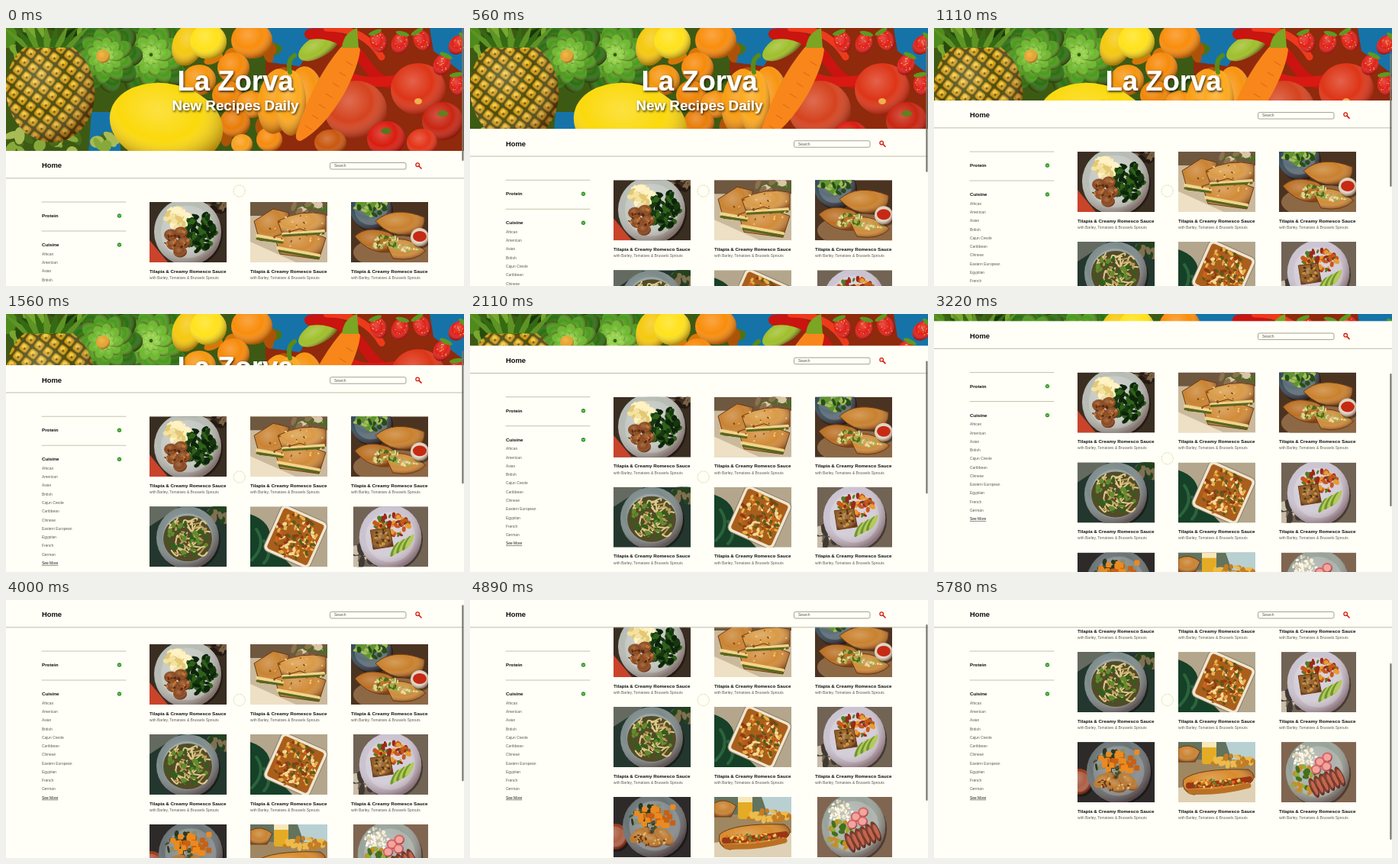
An HTML page that plays this animation: 600x338 px, repeating every 5.89 s.

```html
<!DOCTYPE html>
<html lang="en">
<head>
<meta charset="utf-8">
<style>
  html, body { margin: 0; height: 100%; overflow: hidden; background: #fffff8; }
  svg { display: block; width: 100vw; height: 100vh; font-family: "Liberation Sans", Arial, sans-serif; }
  .bold { font-weight: bold; }
  .small { font-size: 4.93px; fill: #5c5c52; }
  .label { font-size: 6.24px; font-weight: bold; fill: #0c0c0a; }
  .title { fill: #fff; font-weight: bold; text-anchor: middle; filter: url(#shadow); }
</style>
</head>
<body>
<svg id="stage" viewBox="0 0 600 338"></svg>
<script>
const PAPER = '#fffff8', NAV_TOP = 161, LOOP = 5890, STEP = LOOP / 53;

let seed = 7;
const rand = () => (seed = (seed * 16807) % 2147483647) / 2147483647;
const between = (a, b) => a + rand() * (b - a);
const repeat = (n, make) => Array.from({ length: n }, (_, i) => make(i)).join('');

const rect = (x, y, w, h, fill, extra = '') =>
  `<rect x="${x}" y="${y}" width="${w}" height="${h}" fill="${fill}" ${extra}/>`;
const oval = (x, y, rx, ry, fill, turn = 0) =>
  `<ellipse cx="${x}" cy="${y}" rx="${rx}" ry="${ry}" fill="${fill}" transform="rotate(${turn} ${x} ${y})"/>`;
const ball = (x, y, rx, ry, fill, turn = 0) =>
  oval(x, y, rx, ry, fill, turn) + oval(x, y, rx, ry, 'url(#shade)', turn);
const shape = (d, fill) => `<path d="${d}" fill="${fill}"/>`;
const line = (d, color, width) =>
  `<path d="${d}" fill="none" stroke="${color}" stroke-width="${width}" stroke-linecap="round"/>`;
const text = (x, y, s, cls, extra = '') => `<text x="${x}" y="${y}" class="${cls}" ${extra}>${s}</text>`;
const group = (x, y, body, extra = '') => `<g transform="translate(${x} ${y})" ${extra}>${body}</g>`;

// Random flecks inside an ellipse
const scatter = (n, x, y, rx, ry, size, colors) => repeat(n, i => {
  const a = between(0, 6.283), r = Math.sqrt(rand());
  return oval(x + rx * r * Math.cos(a), y + ry * r * Math.sin(a), size * between(.7, 1.4),
    size * between(.4, .9), colors[i % colors.length], between(0, 180));
});

const rosette = (x, y, size) => ['#2c6f12', '#4b9a1c', '#6cb92b', '#8fd044'].map((color, ring) => {
  const r = size * (1 - ring * .25);
  return repeat(9, i => {
    const deg = i * 40 + ring * 20, a = deg * Math.PI / 180;
    return ball(x + r * .62 * Math.cos(a), y + r * .62 * Math.sin(a), r * .45, r * .33, color, deg);
  });
}).join('');

const strawberry = (x, y, turn) => `<g transform="rotate(${turn} ${x} ${y})">` +
  ball(x, y, 11, 14, '#e0201a') + scatter(14, x, y, 9, 11, .8, ['#ffc34a']) +
  oval(x, y - 13, 9, 3, '#5b9a22') + '</g>';

const banner = () => [
  rect(0, 0, 600, 165, '#3d5a14'),
  rect(340, 0, 260, 165, '#8f2a0c'),
  shape('M335 0H415L385 50L345 45ZM555 0H600V60L560 30ZM112 110H150V165H108Z', '#1673a8'),
  scatter(50, 60, 15, 100, 40, 13, ['#264c0d', '#4f8b1c', '#79a72f', '#17360b']),
  scatter(30, 60, 150, 90, 18, 9, ['#86a93a', '#476b1a', '#a9bb55']),
  rosette(190, 35, 52), rosette(130, 36, 46),
  ball(127, 37, 9, 9, '#e5a52b'),
  ball(58, 82, 58, 68, 'url(#rind)', -8),
  repeat(9, i => shape(`M${22 + i * 7} 25Q${8 + i * 10} 12 ${-8 + i * 15} -5L${38 + i * 6} 26Z`, i % 2 ? '#356a14' : '#5d9425')),
  scatter(24, 290, 75, 95, 70, 11, ['#d97508', '#ac5308', '#4a7417']),
  ball(238, 22, 20, 28, '#f5c90f', 18), ball(265, 18, 24, 23, '#ffe21a'),
  ball(322, 16, 27, 24, '#f98d0c'), ball(298, 52, 21, 20, '#f78a0a'),
  ball(253, 68, 22, 20, '#f5960e'), ball(290, 88, 20, 19, '#ef8608'),
  ball(321, 100, 19, 18, '#f79311'), ball(300, 124, 20, 19, '#e97c08'),
  ball(345, 146, 17, 16, '#f78b0c'), ball(309, 152, 14, 13, '#f8a01b'),
  ball(210, 126, 75, 53, '#fbd90c', 12),
  ball(354, 96, 24, 43, '#f99d12', 8), ball(394, 92, 24, 42, '#f79410', -6), ball(373, 98, 20, 43, '#fda91d'),
  line('M372 58Q368 42 378 36', '#5a8a18', 6),
  ball(410, 24, 30, 14, '#9fbf2a', -30),
  line('M398 8Q440 2 470 45T520 62', '#c91410', 14), line('M420 0Q470 0 492 38', '#ee3a1c', 9),
  line('M442 60Q470 78 520 66', '#d81a12', 13),
  ball(458, 107, 41, 38, '#d5431f'), ball(540, 80, 36, 34, '#dd3517'),
  ball(498, 145, 25, 23, '#d81d10'), ball(572, 122, 27, 25, '#c82612'), ball(545, 150, 20, 18, '#e33418'),
  ball(425, 150, 21, 17, '#c9570f'),
  oval(540, 96, 5, 4, '#f0b04a'), oval(498, 135, 7, 4, '#56781c'), oval(572, 112, 7, 4, '#63801e'),
  strawberry(488, 18, -20), strawberry(516, 20, 15), strawberry(545, 16, -30),
  strawberry(571, 48, 25), strawberry(592, 74, -10), strawberry(592, 22, 40),
  shape('M438 26Q454 10 464 28Q462 50 443 86Q416 132 386 148Q376 148 382 132Q404 66 438 26Z', '#f8861a'),
  repeat(7, i => line(`M${446 - i * 9} ${44 + i * 14}l8 5`, '#d8660d', 1)),
  shape('M440 26Q442 6 460 0L462 26Z', '#7ba522')
].join('');

const plate = (x, y, r, color) =>
  oval(x + 2, y + 3, r, r * .98, '#00000066') + ball(x, y, r, r, color) + oval(x, y, r * .8, r * .78, '#ffffff30');
const backdrop = color => rect(0, 0, 101, 79, color);
const bread = (d, crust = '#c98332') => shape(d, crust) + `<path d="${d}" fill="url(#shade)" stroke="#6d3b12"/>`;
const GREENS = ['#17380f', '#2f6119', '#0d240b'];

const photos = [
  () => backdrop('#3a2d22') + shape('M0 50L24 79H0Z', '#c9442a') + scatter(20, 85, 8, 20, 10, 4, ['#7b6144', '#241a13']) +
    plate(50, 39, 44, '#b6bbb3') + scatter(90, 66, 40, 19, 25, 4.5, GREENS) +
    scatter(45, 36, 20, 15, 12, 4.5, ['#f3e2a2', '#e4c873', '#fff2c4']) +
    [[28, 43], [41, 40], [31, 55], [45, 53], [40, 65]].map(([x, y]) => ball(x, y, 9, 7.5, '#8b481c')).join('') +
    scatter(20, 37, 50, 17, 14, 2, ['#5c2a10', '#c27a38']),
  () => backdrop('#cbb99c') + rect(0, 0, 101, 18, '#6f5840') + scatter(25, 80, 8, 24, 10, 5, ['#8f7050', '#4d6b25', '#d8c6a7']) +
    shape('M0 52L60 79H0Z', '#eee0c5') +
    bread('M5 25L30 9L51 14L43 53L12 50Z') + bread('M36 25Q66 9 99 16V39L42 42Z', '#d99a46') +
    bread('M32 45L65 35L99 47L90 75L39 68Z', '#d18b38') +
    line('M9 44L42 50M43 42L96 38M36 60L90 70', '#f1d48c', 4) + line('M9 48L42 53M43 44L96 41M38 64L89 73', '#55691f', 3) +
    scatter(30, 61, 36, 36, 24, 1.4, ['#8c4c18', '#f2c779']),
  () => backdrop('#4b3322') + plate(26, 9, 27, '#344b58') + scatter(45, 27, 7, 22, 11, 4, ['#5f9430', '#a3bd57', '#294d17']) +
    oval(58, 66, 55, 22, '#8d6844') +
    bread('M32 25Q56 4 96 20Q98 40 73 43Q50 45 32 25Z', '#c9812d') + bread('M5 45Q20 30 49 40Q66 49 55 65Q25 70 5 45Z', '#b96f24') +
    bread('M45 53Q70 40 98 64Q84 79 55 74Z', '#d08c3a') +
    scatter(40, 45, 53, 18, 9, 2.5, ['#a7b34e', '#e4d594', '#486b1d']) + scatter(25, 73, 60, 17, 5, 2, ['#9bad49', '#e9d9a0']) +
    plate(90, 46, 12, '#ddd2bb') + oval(90, 45, 9, 7, '#c62a14'),
  () => backdrop('#23372e') + shape('M0 0H40L0 26Z', '#646a60') + scatter(20, 85, 10, 18, 14, 6, ['#24421e', '#7f704f']) +
    plate(50, 41, 41, '#7c8a8a') + oval(50, 42, 32, 30, '#514c27') +
    repeat(42, () => { const x = between(25, 67), y = between(20, 63);
      return line(`M${x} ${y}q${between(-14, 14)} ${between(-16, 16)} ${between(2, 14)} ${between(-8, 8)}`, rand() < .6 ? '#e0c98a' : '#b99c58', 2); }) +
    scatter(32, 50, 41, 28, 25, 3.5, ['#315e1c', '#628b2d']),
  () => backdrop('#b3a68c') + shape('M0 10Q30 20 26 48L55 79H0Z', '#164027') + line('M2 70Q22 50 8 30M18 74Q30 62 18 45', '#2b633d', 4) +
    '<g transform="rotate(24 58 40)">' + rect(26, 6, 66, 66, '#efe5cf', 'rx="7" stroke="#8b7c63"') +
    rect(30, 10, 58, 58, '#a95e1b', 'rx="4"') + '</g>' +
    scatter(150, 59, 39, 28, 29, 2.7, ['#e6b24c', '#8e3b12', '#f3d894', '#c8641d', '#5c5a1d']),
  () => backdrop('#716455') + scatter(16, 12, 65, 15, 15, 7, ['#c9bda8', '#413a32']) +
    plate(50, 40, 42, '#c9c2cf') + scatter(60, 52, 24, 24, 15, 3.5, ['#c8571c', '#547a22', '#e89b31', '#9b291b']) +
    bread('M23 31L49 28L54 52L27 56Z', '#8e5a23') + scatter(22, 38, 41, 12, 11, 1.8, ['#51320f', '#cd9846']) +
    repeat(6, i => oval(56 + i * 4, 56 - i * 2, 3, 11, i % 2 ? '#b6c95a' : '#6e982e', 30)),
  () => backdrop('#2d2a29') + plate(2, 52, 17, '#993b1b') + plate(54, 38, 42, '#697274') +
    scatter(50, 48, 33, 30, 24, 3.5, ['#2a3720', '#8b8d73', '#4a522d']) +
    repeat(30, () => rect(between(27, 76), between(8, 36), 7, 7, rand() < .6 ? '#eb8a1e' : '#c96012', 'rx="1.5"')) +
    [[35, 50, -30], [50, 57, 15], [66, 52, 40]].map(([x, y, a]) => ball(x, y, 15, 8.5, '#ba7930', a)).join('') +
    scatter(26, 51, 54, 23, 11, 1.8, ['#6c3612', '#e4b76b']),
  () => backdrop('#9f8762') + rect(0, 0, 101, 23, '#62735e') + rect(31, 0, 19, 29, '#e5ab25', 'rx="3"') + rect(31, 0, 19, 7, '#f6e8bc') +
    shape('M62 0H101V25L70 23Z', '#b9d0d2') + bread('M0 8Q14 0 29 12L22 26H0Z') + shape('M0 60L101 47V79H0Z', '#dfd1b5') +
    scatter(35, 72, 25, 28, 7, 4, ['#ecbb4b', '#c47d22']) +
    bread('M7 49Q25 34 92 36Q106 45 92 56L20 69Q3 65 7 49Z', '#d78b2c') +
    line('M14 57Q50 56 93 49', '#9b3516', 8) + scatter(55, 53, 54, 40, 6, 2, ['#f1c54f', '#66822a', '#e46a24']) +
    line('M16 65Q55 67 92 57', '#ba7024', 7),
  () => backdrop('#806651') + plate(49, 39, 43, '#98a299') + scatter(90, 33, 20, 17, 15, 2, ['#f7efd6', '#dbcfae', '#fffaf0']) +
    scatter(35, 35, 50, 21, 19, 4, ['#446f1f', '#c88d28', '#97ad38']) +
    repeat(6, i => ball(44 + i * 7, 60 - i * 3, 4.8, 14, '#75301f', -25) + oval(45 + i * 7, 60 - i * 3, 2.5, 10, '#c2664f', -25)) +
    [[52, 26], [62, 20], [47, 36], [61, 32]].map(([x, y]) => ball(x, y, 7, 6.5, '#d8596a') + oval(x, y, 5, 4.6, '#f1a797')).join('')
];

const card = (photo, i) => {
  const col = i % 3, inset = col === 2 && i > 2 ? 3 : 0;
  return group(188 + col * 132, 228 + Math.floor(i / 3) * 118,
    `<svg x="${inset}" width="${101 - inset}" height="79" viewBox="0 0 101 79" preserveAspectRatio="none">${photo()}</svg>` +
    text(0, 92.7, 'Tilapia &amp; Creamy Romesco Sauce', 'label') +
    text(0, 100.8, 'with Barley, Tomatoes &amp; Brussels Sprouts', 'small'));
};

const cuisines = ['African', 'American', 'Asian', 'British', 'Cajun Creole', 'Caribbean', 'Chinese',
  'Eastern European', 'Egyptian', 'French', 'German'];
const heading = (y, name) => line(`M47 ${y - 18}H157`, '#b4b496', .8) + text(47, y + 2.2, name, 'label') +
  oval(148.5, y, 2.7, 2.7, '#2f9a1d') + line(`M147.3 ${y - .5}l1.2 1.2l1.2 -1.2`, '#fff', .7);
const sidebar = heading(85, 'Protein') + heading(123, 'Cuisine') +
  cuisines.map((name, i) => text(47, 136.7 + i * 11.27, name, 'small')).join('') +
  text(47, 260.7, 'See More', 'small', 'style="fill:#222;text-decoration:underline"');

const nav = rect(0, 0, 600, 35.5, PAPER) + rect(0, 35.3, 600, 1, '#bdbda4') +
  text(47, 22.3, 'Home', 'bold', 'font-size="9.4" fill="#0c0c0a"') +
  rect(424.5, 15.5, 99.5, 8.5, PAPER, 'rx="2" stroke="#8c8c74" stroke-width=".8"') +
  text(430, 21.4, 'Search', 'small') +
  '<circle cx="539.2" cy="18.2" r="2.3" fill="none" stroke="#d8200c" stroke-width="1.3"/>' +
  line('M541 20l3 3', '#d8200c', 1.7);

const stage = document.getElementById('stage');
stage.innerHTML = `<defs>
  <radialGradient id="shade" cx=".4" cy=".35" r=".65">
    <stop offset="0" stop-color="#fff" stop-opacity=".22"/><stop offset=".55" stop-color="#fff" stop-opacity="0"/>
    <stop offset="1" stop-color="#300" stop-opacity=".4"/>
  </radialGradient>
  <pattern id="rind" width="14" height="14" patternUnits="userSpaceOnUse" patternTransform="rotate(45)">
    ${rect(0, 0, 14, 14, '#4c4a0c') + rect(1.5, 1.5, 11, 11, '#d29a18', 'rx="3"') + oval(6, 6, 3, 3, '#f0c93c') + oval(8, 8, 1.4, 1.4, '#5a4a0c')}
  </pattern>
  <filter id="shadow"><feDropShadow dx="1" dy="1.5" stdDeviation="1.4" flood-color="#000" flood-opacity=".85"/></filter>
</defs>` + banner() +
  text(300.5, 82, 'La Zorva', 'title', 'font-size="36.5"') +
  text(300.5, 108, 'New Recipes Daily', 'title', 'font-size="18.8"') +
  group(0, 0, rect(0, 0, 600, 340, PAPER) + sidebar, 'id="page"') +
  group(0, 0, photos.map(card).join(''), 'id="cards"') +
  group(0, 0, nav, 'id="nav"') +
  rect(597.3, 0, 2.2, 174, '#77776c', 'id="thumb" rx="1.1"') +
  '<circle id="pointer" cx="305.7" r="7.6" fill="#fffff0" fill-opacity=".4" stroke="#d3d39a" stroke-dasharray="1.6 1.2"/>';

const [page, cards, navBar, thumb, pointer] =
  ['page', 'cards', 'nav', 'thumb', 'pointer'].map(id => document.getElementById(id));

// Scroll distance at given times, joined by a smooth cubic
const keys = [[0, 0], [560, 29], [1560, 94], [2560, 135], [4000, 170], [4890, 206], [5780, 278]];
const slope = i => {
  if (i === 0) return .03;
  const a = keys[i - 1], b = keys[Math.min(i + 1, keys.length - 1)];
  return (b[1] - a[1]) / (b[0] - a[0]);
};
function scrollAt(t) {
  const i = Math.min(keys.length - 2, keys.findLastIndex(k => k[0] <= t));
  const [t0, v0] = keys[i], [t1, v1] = keys[i + 1], d = t1 - t0, u = Math.min(1, (t - t0) / d);
  return v0 + (v1 - v0) * u * u * (3 - 2 * u) + d * u * (1 - u) * (slope(i) * (1 - u) - slope(i + 1) * u);
}

const move = (node, y) => node.setAttribute('transform', `translate(0 ${y})`);

function draw(t) {
  const scroll = scrollAt(t), top = Math.max(0, NAV_TOP - scroll), inner = scroll > NAV_TOP;
  move(page, top);
  move(navBar, top);
  move(cards, -scroll);
  thumb.setAttribute('y', inner ? (scroll - NAV_TOP) * .71 : scroll * .515);
  thumb.setAttribute('height', inner ? 231 : 174);
  const u = Math.min(1, Math.max(0, (t - 2900) / 900));
  pointer.setAttribute('cy', 213.5 - 82.5 * u * u * (3 - 2 * u));
}

const start = performance.now();
function tick() {
  const t = (performance.now() - start) % LOOP;
  draw(Math.min(52, Math.floor((t + 5) / STEP)) * STEP);
  requestAnimationFrame(tick);
}
tick();
</script>
</body>
</html>
```
